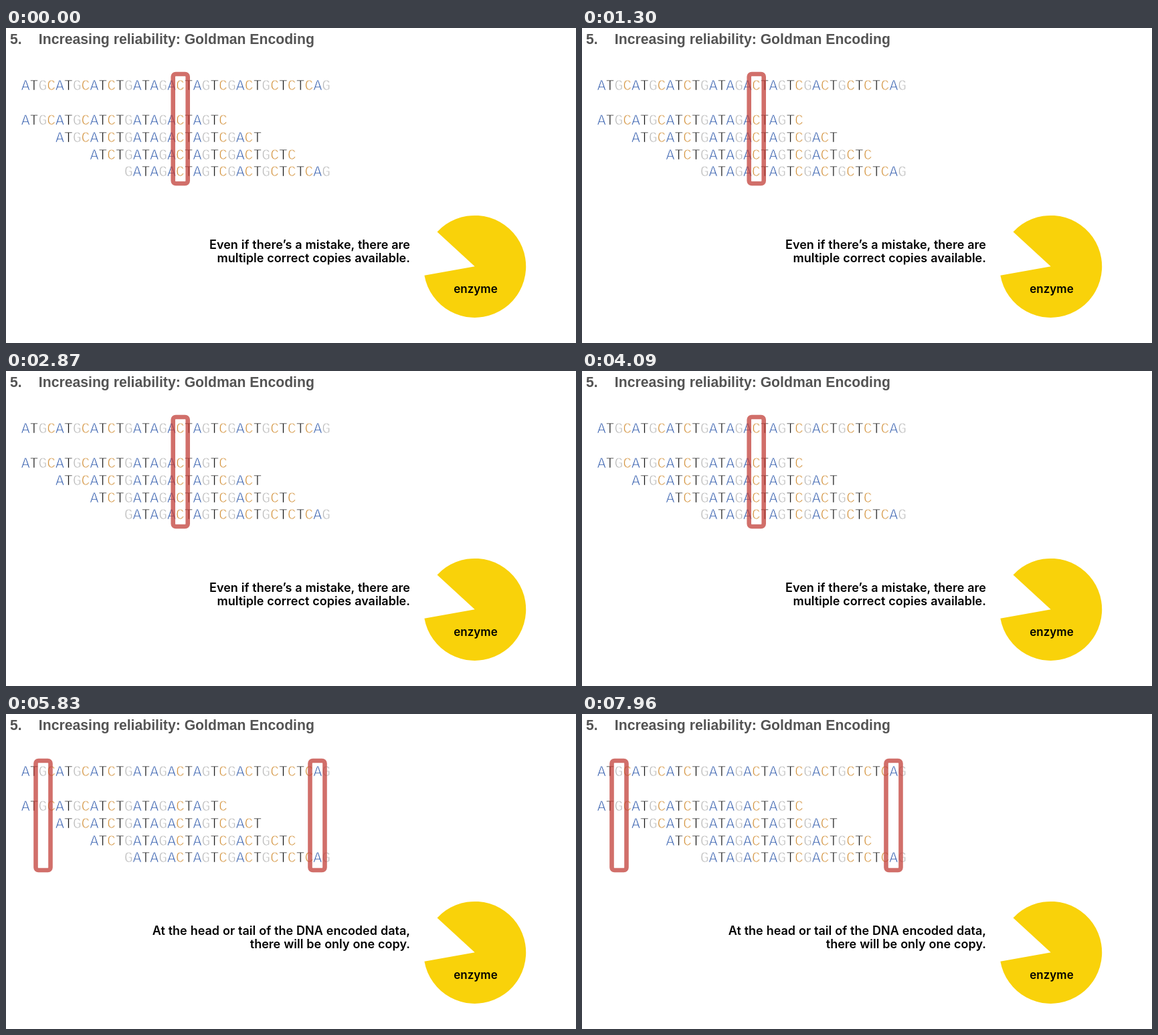
These frames come from a looping animation (852x472 px, 8 s). An HTML page:

```html
<!DOCTYPE html>
<html lang="en">
<head>
<meta charset="utf-8">
<title>Increasing reliability</title>
<style>
  html, body { margin: 0; width: 100%; height: 100%; overflow: hidden; background: #fff; }
  svg { display: block; width: 852px; height: 472px; }
  .title { font: bold 21.2px "Liberation Sans", Arial, sans-serif; fill: #545454; }
  /* The white outline thins the letters to a light weight. */
  .dna { font: 21.4px "Liberation Mono", "Courier New", monospace; stroke: #fff; stroke-width: .75; }
  .note { font: 600 18px Inter, sans-serif; word-spacing: .4px; text-anchor: end; }
  .label { font: 600 17px Inter, sans-serif; text-anchor: middle; }
  .A { fill: #3c64b1; }
  .T { fill: #111; }
  .G { fill: #b8b8b8; }
  .C { fill: #d4943f; }
  .marker { fill: none; stroke: #c23f38; stroke-opacity: .75; stroke-width: 6.6; }
</style>
</head>
<body>
<svg viewBox="0 0 852 472">
  <g class="title">
    <text x="6" y="24">5.</text>
    <text x="48.8" y="24">Increasing reliability: Goldman Encoding</text>
  </g>
  <g id="strands" class="dna"></g>

  <g id="middle">
    <rect class="marker" x="249.7" y="69" width="22" height="164" rx="4"/>
    <g class="note">
      <text x="604" y="331">Even if there’s a mistake, there are</text>
      <text x="604" y="350.5">multiple correct copies available.</text>
    </g>
  </g>
  <g id="ends">
    <rect class="marker" x="44.5" y="70" width="22" height="164" rx="4"/>
    <rect class="marker" x="454.5" y="70" width="22" height="164" rx="4"/>
    <g class="note">
      <text x="604" y="331">At the head or tail of the DNA encoded data,</text>
      <text x="604" y="350.5">there will be only one copy.</text>
    </g>
  </g>

  <path fill="#f9d20a" d="M700.7 357.2 L644.5 305.5 A76.5 76.5 0 1 1 625.4 370.8 Z"/>
  <text class="label" x="702" y="397">enzyme</text>
</svg>
<script>
  const LOOP = 8000, SWITCH = 5460;
  const SEQUENCE = "ATGCATGCATCTGATAGACTAGTCGACTGCTCTCAG";
  const LEFT = 22.7, PITCH = 12.84, COPY_LENGTH = 24, SHIFT = 4;
  const byId = id => document.getElementById(id);

  function strand(start, length, y) {
    const letters = [...SEQUENCE.substr(start, length)]
      .map(base => `<tspan class="${base}">${base}</tspan>`).join("");
    return `<text x="${LEFT + start * PITCH}" y="${y}">${letters}</text>`;
  }

  let strands = strand(0, SEQUENCE.length, 93.3);
  for (let i = 0; i < 4; i++) strands += strand(i * SHIFT, COPY_LENGTH, 145 + i * 25.8);
  byId("strands").innerHTML = strands;

  const startTime = performance.now();
  function draw() {
    const showEnds = (performance.now() - startTime) % LOOP >= SWITCH;
    byId("middle").style.display = showEnds ? "none" : "";
    byId("ends").style.display = showEnds ? "" : "none";
    requestAnimationFrame(draw);
  }
  draw();
</script>
</body>
</html>
```
